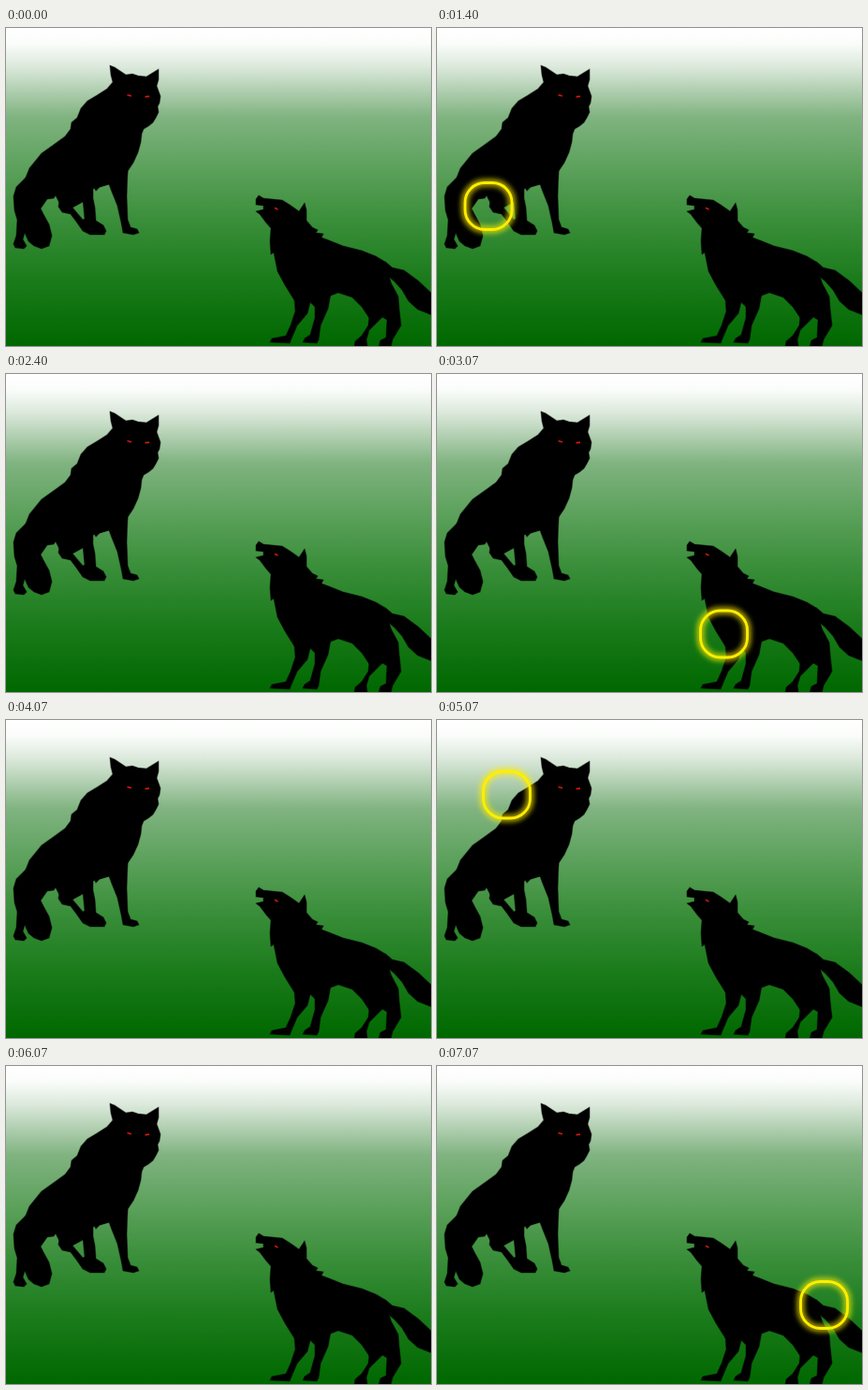
An HTML page that plays this animation: 454 by 340 pixels, repeating every 8000 ms.

```html
<!DOCTYPE html>
<html lang="en">
<head>
<meta charset="utf-8">
<title>Two wolves</title>
<style>
  html, body { margin: 0; width: 100%; height: 100%; overflow: hidden; background: #006800; }
  svg { display: block; width: 454px; height: 340px; }
  .wolf { fill: #000; stroke: #000; stroke-opacity: .4; stroke-width: 1.2; stroke-linejoin: round; }
  .eye { fill: none; stroke: #d81808; stroke-width: 1.6; }
</style>
</head>
<body>
<svg viewBox="0 0 454 340">
  <defs>
    <linearGradient id="sky" x1="0" y1="0" x2="0" y2="1">
      <stop offset="0" stop-color="#fff"/>
      <stop offset=".05" stop-color="#fafcfa"/>
      <stop offset=".12" stop-color="#dce9dc"/>
      <stop offset=".2" stop-color="#aecdae"/>
      <stop offset=".28" stop-color="#80b380"/>
      <stop offset=".42" stop-color="#60a360"/>
      <stop offset=".6" stop-color="#3b8f3b"/>
      <stop offset=".8" stop-color="#197a19"/>
      <stop offset="1" stop-color="#006800"/>
    </linearGradient>
    <filter id="soft" x="-50%" y="-50%" width="200%" height="200%">
      <feGaussianBlur stdDeviation="2.6"/>
    </filter>
  </defs>
  <rect width="454" height="340" fill="url(#sky)"/>

  <g class="wolf">
    <!-- sitting wolf: body, front legs, haunch and tail -->
    <path d="M111 40L116 42 128 50 135 49 141 51 150 52 163 44 163 55 161 62 165 73 164 80 162 84 163 90 160 96 157 101 152 105 147 108 145 113 144 122 141 133 136 144 130 153 128 168 110 167 93 172 82 186 71 192 57 187 53 179 40 180 20 175 21 160 25 150 38 134 52 124 63 116 69 108 70 101 76 96 80 86 87 78 97 72 108 65 114 58 112 50Z"/>
    <path d="M130 150L129 180 130 205 133 213 140 215 142 219 136 221 125 219 123 208 119 190 113 175 110 167 100 170 96 174 93 168 93 182 95 192 96 206 104 211 107 217 105 221 90 221 82 217 75 207 69 199 60 197 56 191 57 184 72 180 71 192 82 205 84 204 82 183 90 155Z"/>
    <path d="M53 179L51 182 44 183 37 193 40 199 46 210 49 222 46 233 38 236 30 233 24 228 20 219 18 226 22 233 19 236 10 235 8 231 11 222 12 205 9 195 8 180 11 170 21 160 40 160Z"/>
    <!-- howling wolf: head and back, front legs, hind legs and tail -->
    <path d="M267 183L270 179 275 182 295 184 303 189 313 196 319 187 321 195 321 206 327 213 333 216 331 219 339 220 337 224 345 227 360 233 380 238 395 244 405 250 412 256 409 266 411 272 402 309 388 310 380 298 370 288 355 283 347 286 325 293 308 291 298 275 290 260 286 240 283 242 282 228 283 214 277 207 271 199 267 196 275 194 275 190 267 189Z"/>
    <path d="M347 284L344 300 336 318 334 333 332 337 317 336 319 332 325 328 330 310 330 298 325 293 322 305 311 318 305 332 303 337 282 336 284 332 299 329 304 318 309 303 308 289 320 270Z"/>
    <path d="M405 250L412 256 425 259 440 270 455 284 455 307 440 301 430 292 423 280 415 271 409 266 411 272 419 287 420 300 422 318 413 333 411 341 398 341 400 334 406 331 407 312 402 309 388 323 385 333 386 341 372 341 373 335 380 329 387 318 388 308 385 270Z"/>
  </g>
  <path class="eye" d="M129.5 71.5l4.5 1.3M148.5 73.6l4.5-.5M287 192.3l3.5 1.8"/>

  <g id="ring" fill="none" stroke="#ffee00" visibility="hidden">
    <rect x="-25" y="-25" width="50" height="50" rx="21" stroke-width="9" stroke-opacity=".6" filter="url(#soft)"/>
    <rect x="-25" y="-25" width="50" height="50" rx="21" stroke-width="2.8"/>
  </g>
</svg>
<script>
  const LOOP = 8000;
  const marks = [
    { from: 1400, to: 2400, x: 55, y: 190.5 },
    { from: 3070, to: 4070, x: 306.5, y: 278 },
    { from: 5070, to: 6070, x: 74.5, y: 80 },
    { from: 7070, to: 8000, x: 413.5, y: 255.5 }
  ];
  const ring = document.getElementById('ring');
  const start = performance.now();

  function draw() {
    const t = (performance.now() - start) % LOOP;
    const mark = marks.find(m => t >= m.from && t < m.to);
    ring.setAttribute('visibility', mark ? 'visible' : 'hidden');
    if (mark) ring.setAttribute('transform', `translate(${mark.x} ${mark.y})`);
    requestAnimationFrame(draw);
  }
  draw();
</script>
</body>
</html>
```
